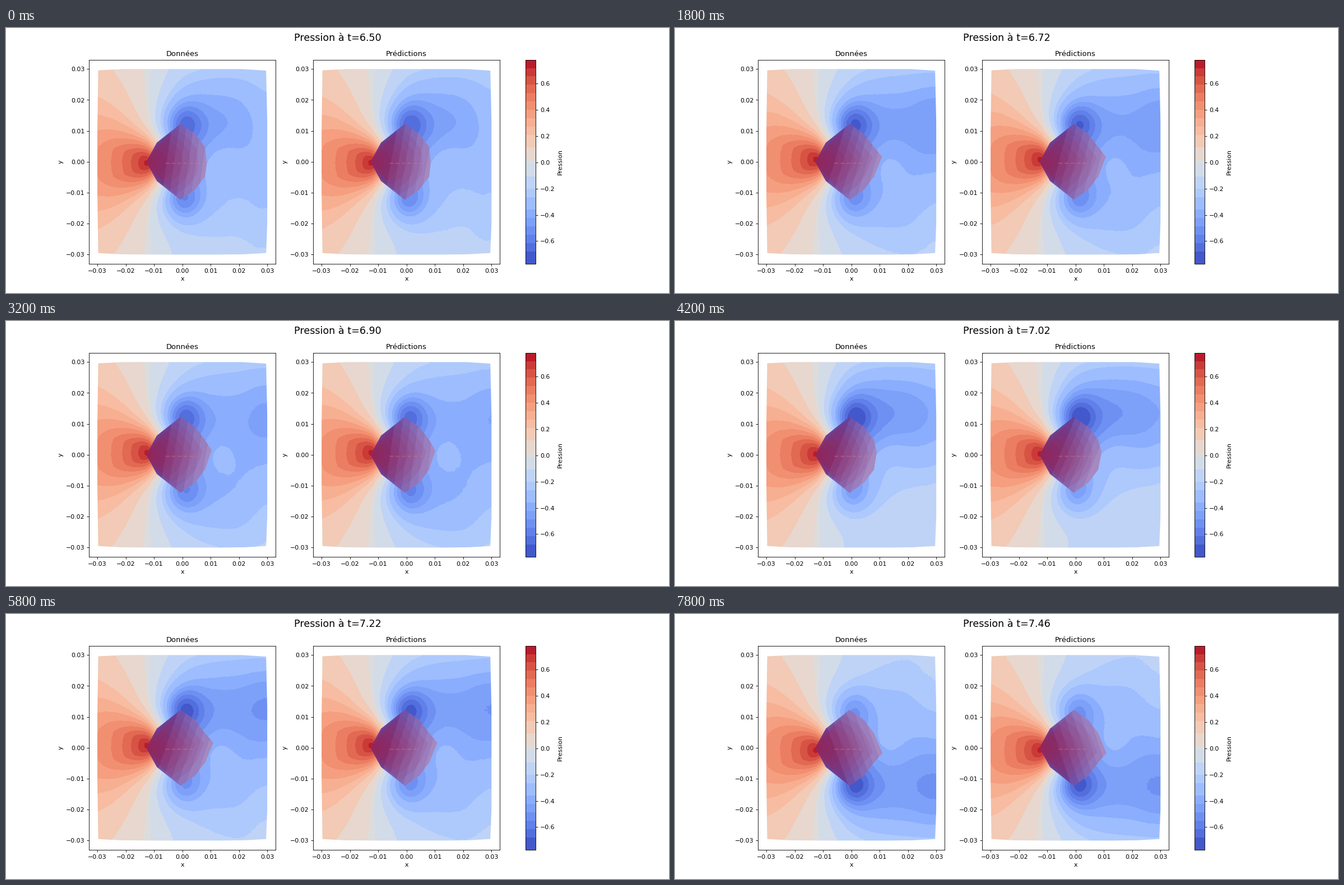
Write a matplotlib script that moves like this. It is 1183 px wide and 473 px high and loops after 8 s.

```python
import matplotlib.pyplot as plt
import numpy as np
from matplotlib.animation import FuncAnimation
from matplotlib.cm import ScalarMappable
from matplotlib.colors import BoundaryNorm, ListedColormap
from matplotlib.patches import Polygon
from matplotlib.path import Path

FRAMES, INTERVAL = 40, 200
T_START, T_STEP = 6.502, 0.02462
PHASE_STEP, PHASE_REF = 0.149, 29      # shedding cycles per step, step of zero phase
LAG = 0.015                            # the prediction runs slightly ahead
TAU = 2 * np.pi

# Pressure bands: wide near zero, then even steps
BAND, MIDDLE = 0.03171, 0.004
low_edges = [-24.5, -21.5, -19.5, -17.5, -15.5, -13.5, -11.5, -8.5, -6.5, -3.5, -0.5]
high_edges = [0.5, 3.5] + [6.5 + 2 * i for i in range(10)]
LEVELS = MIDDLE + BAND * np.array(low_edges + high_edges)
mids = (LEVELS[1:] + LEVELS[:-1]) / 2
COLORS = plt.get_cmap("coolwarm")((mids - LEVELS[0]) / (LEVELS[-1] - LEVELS[0]))

# Field coordinates in centimetres
X, Y = np.meshgrid(np.linspace(-3, 3, 151), np.linspace(-3, 3, 166))
ROUGH = np.random.default_rng(4).normal(0, 0.0008, X.shape)


def bell(x, y, cx, cy, size):
    return np.exp(-((x - cx) ** 2 + (y - cy) ** 2) / size ** 2)


def wave(phase, peak):
    return np.cos(TAU * (phase - peak))


def pressure(x, y, phase):
    # Stagnation point: high upstream, low downstream
    dy = y - 0.08 * wave(phase, 0)
    r = np.hypot(x + 1.25, dy) + 1e-9
    ahead = np.clip((-1.17 - x) / r, -1, 1)
    ahead = np.where(ahead > 0, ahead, -np.abs(ahead) ** 0.8)
    near = np.exp(-(r / 0.9) ** 2)
    p = 0.755 / (1 + 0.5 * r) * (near + (1 - near) * ahead)

    # Wake with a weaker core right behind the obstacle
    ramp = (1 + np.tanh(1.5 * (x + 0.3))) / 2
    belt = np.exp(-(y / 2.8) ** 4)
    pulse = 0.018 * np.clip(x, 0, 3) * np.cos(2 * TAU * phase)
    p -= ramp * belt * (0.11 + pulse)
    p += 0.1 * bell(x, y, 1.2, 0, 0.9)

    # Alternating vortices, delayed downstream
    delay = 0.04 * (1 + np.tanh(2 * (x - 2.4)))
    p -= 0.15 * ramp * np.sin(np.pi * y / 3.2) * wave(phase, 0.83 + delay)

    # Vortices anchored to both corners
    swing = 0.05 * wave(phase, 0.95)
    p -= (0.25 + swing) * bell(x, y, 0.03, 1.25, 0.68)
    p -= (0.25 - swing) * bell(x, y, 0.03, -1.25, 0.68)
    return p


DOMAIN = np.array([
    (-2.97, 2.96), (-2.1, 3), (2.1, 3), (2.96, 2.95), (3, 1.3), (3, -2),
    (2.96, -2.95), (2.2, -2.99), (1.3, -3), (-1, -3), (-2.2, -2.99),
    (-2.97, -2.95), (-3, -1), (-3, 1)])
APEX = np.array([-1.27, 0])
SCALES = [1, 0.86, 0.73, 0.6, 0.47, 0.34, 0.22, 0.12]
RED = (0.74, 0.07, 0.17)


def body_outline(sway):
    side = [(-0.9, 0.62), (-0.06, 1.23), (0.45, 0.9), (0.8, 0.48)]
    tip = (0.84 + 0.26 * sway ** 2, 0.17 * sway)
    lower = [(x, -y) for x, y in reversed(side)]
    return np.array([tuple(APEX)] + side + [tip] + lower)


plt.rcParams["font.family"] = "DejaVu Sans"
fig, axes = plt.subplots(1, 2, figsize=(15, 5.9975), dpi=78.87)
title = fig.suptitle("", fontsize=16)

bands = ScalarMappable(BoundaryNorm(LEVELS, len(COLORS)), ListedColormap(COLORS))
bar = fig.colorbar(bands, ax=axes, label="Pression", spacing="proportional",
                   ticks=np.arange(-3, 4) * 0.2)
bar.minorticks_off()

for ax, name in zip(axes, ("Données", "Prédictions")):
    ax.set(title=name, xlabel="x", ylabel="y",
           xlim=(-0.033, 0.033), ylim=(-0.033, 0.033),
           xticks=np.arange(-3, 4) / 100, yticks=np.arange(-3, 4) / 100)

drawn = []


def fill(ax, field, outline, z):
    field = np.clip(field, LEVELS[0] + 0.001, LEVELS[-1] - 0.001)
    cs = ax.contourf(X / 100, Y / 100, field, levels=LEVELS, colors=COLORS, zorder=z)
    closed = np.vstack([outline, outline[:1]]) / 100
    cs.set_clip_path(Path(closed), ax.transData)
    drawn.append(cs)


def draw_panel(ax, phase):
    fill(ax, pressure(X, Y, phase) + ROUGH, DOMAIN, 1)

    # Flat facets across the obstacle
    sway = wave(phase, -0.02)
    outline = body_outline(sway)
    top, bottom, rear = (pressure(*p, phase) for p in [(0, 1.25), (0, -1.25), (1, 0)])
    mean = (top + bottom) / 2
    facets = mean + (rear - mean) * (X + 0.2) + (top - bottom) * Y / 2.5
    fill(ax, np.maximum(facets, -0.68), outline, 1.1)

    # Red layers stacked towards the front point
    for scale in SCALES:
        alpha = 0.3 if scale == 1 else 0.1
        layer = Polygon((APEX + (outline - APEX) * scale) / 100, facecolor=RED,
                        edgecolor="none", alpha=alpha, zorder=1.2)
        drawn.append(ax.add_patch(layer))
    end = (0.8 - 0.4 * sway ** 2) / 100
    drawn.extend(ax.plot([-0.006, end], [-0.0004, -0.0004], color=(0.9, 0.5, 0.45),
                         lw=1.3, alpha=0.45, dashes=(5, 2.5), zorder=1.3))


def update(i):
    while drawn:
        drawn.pop().remove()
    title.set_text(f"Pression à t={T_START + T_STEP * i:.2f}")
    phase = (i - PHASE_REF) * PHASE_STEP
    draw_panel(axes[0], phase)
    draw_panel(axes[1], phase + LAG)
    return []


anim = FuncAnimation(fig, update, frames=FRAMES, interval=INTERVAL,
                     init_func=lambda: [], repeat=True, repeat_delay=0)
plt.show()
```
